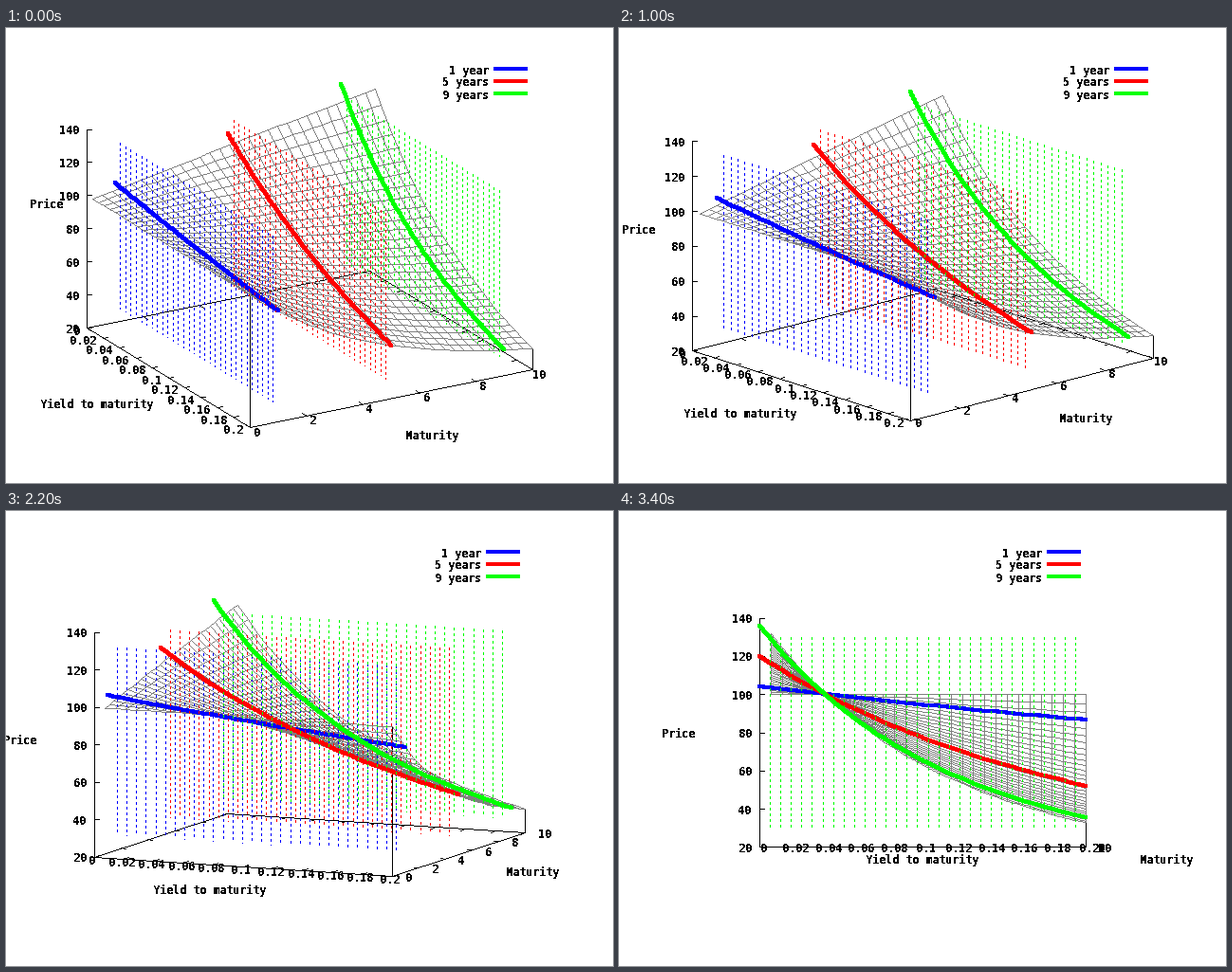
Animation of 640 by 480 pixels, one loop 8000 ms. Source, as a matplotlib script:

```python
import numpy as np
import matplotlib.pyplot as plt
from matplotlib.animation import FuncAnimation

plt.rcParams.update({
    "font.family": "DejaVu Sans Mono",
    "font.weight": "bold",
    "text.antialiased": False,
    "text.hinting_factor": 1,
})

W, H, DPI = 640, 480, 80
BLACK, GRAY = (0, 0, 0), (128, 128, 128)
BLUE, RED, GREEN = (0, 0, 255), (255, 0, 0), (0, 255, 0)
BONDS = [(1, "1 year", BLUE), (5, "5 years", RED), (9, "9 years", GREEN)]
COUPON, FACE = 4, 100

fig = plt.figure(figsize=(W / DPI, H / DPI), dpi=DPI, facecolor="white")
ax = fig.add_axes([0, 0, 1, 1])
ax.axis("off")
canvas = np.full((H, W, 3), 255, np.uint8)
screen = ax.imshow(canvas, interpolation="nearest", aspect="auto")


def price(rate, years):
    disc = (1 + rate) ** -years
    return COUPON * (1 - disc) / rate + FACE * disc


class View:
    """Orthographic view; u = yield and v = maturity in 0..1, z = price."""

    def __init__(self, tilt, turn):
        self.s, self.c = np.sin(np.radians(turn)), np.cos(np.radians(turn))
        self.st, self.ct = np.sin(np.radians(tilt)), np.cos(np.radians(tilt))

    def __call__(self, u, v, z=20):
        u, v, w = np.broadcast_arrays(u - 0.5, v - 0.5, (z - 20) / 120 - 0.5)
        x = 320 + 344 * (u * self.c + v * self.s)
        y = 233.5 + 242 * ((u * self.s - v * self.c) * self.ct - w * self.st)
        return np.stack([x, y], axis=-1)


def unit(vec):
    size = np.hypot(*vec)
    return vec / size if size > 1e-6 else np.zeros(2)


def stroke(segs, color, width=1, dash=None):
    """Draw crisp pixel lines with a square brush; dash = length of dash and gap."""
    segs = np.rint(segs)
    start, delta = segs[:, 0], segs[:, 1] - segs[:, 0]
    steps = np.abs(delta).max(axis=1).astype(int)
    count = steps + 1
    i = np.repeat(np.arange(len(segs)), count)
    k = np.arange(len(i)) - np.repeat(np.cumsum(count) - count, count)
    if dash:
        lit = k % (2 * dash) < dash
        i, k = i[lit], k[lit]
    t = k / np.maximum(steps[i], 1)
    x, y = np.rint(start[i] + delta[i] * t[:, None]).astype(int).T
    brush = np.arange(width) - width // 2
    for dx in brush:
        for dy in brush:
            canvas[y + dy, x + dx] = color


def chain(points):
    """Segments joining neighbours along the second-last axis."""
    return np.stack([points[..., :-1, :], points[..., 1:, :]], axis=-2).reshape(-1, 2, 2)


def label(s, ha="center"):
    return ax.text(0, 0, s, ha=ha, va="baseline", fontsize=11.63 * 72 / DPI,
                   color="black")


def place(text, pos, dx=0.0, dy=0.0):
    text.set_position((pos[0] + dx, pos[1] + dy + 4))


rate_ticks = np.arange(11) / 10
year_ticks = np.arange(6) / 5
cash_ticks = np.arange(20, 141, 20)
names = [label(name, "right") for _, name, _ in BONDS]
rate_labels = [label(f"{0.2 * t:.2g}") for t in rate_ticks]
year_labels = [label(f"{10 * t:.0f}") for t in year_ticks]
cash_labels = [label(str(z), "right") for z in cash_ticks]
rate_title, year_title, cash_title = map(
    label, ("Yield to maturity", "Maturity", "Price"))

# The surface is undefined at zero yield, so the first row is skipped.
grid = np.arange(30) / 29
U, V = np.meshgrid(grid[1:], grid, indexing="ij")
Z = price(0.2 * U, 10 * V)
drop_u = np.arange(1, 31) / 31
curve_u = np.linspace(1e-7, 1, 40)


def draw_box(view, rate_dir, year_dir):
    left, front, right, back = (view(*c) for c in ((0, 0), (1, 0), (1, 1), (0, 1)))
    segs = [(left, front), (front, right), (right, back), (back, left),
            (left, view(0, 0, 140)),
            (front, view(1, 0, 100)),
            (right, view(1, 1, price(0.2, 10)))]
    for t in rate_ticks:
        a, b = view(t, 0), view(t, 1)
        segs += [(a, a + 5 * year_dir), (b, b - 5 * year_dir)]
    for t in year_ticks:
        a, b = view(0, t), view(1, t)
        segs += [(a, a + 5 * rate_dir), (b, b - 5 * rate_dir)]
    for z in cash_ticks:
        a = view(0, 0, z)
        segs.append((a, a + [5, 0]))
    stroke(np.array(segs), BLACK)


def draw_labels(view, rate_dir, year_dir):
    if view.s > 0.5:
        rate_dx, rate_ha = -8 * year_dir[0], "right"
        year_dx, year_ha = 7.9 * rate_dir[0], "center"
    else:
        rate_dx, rate_ha = 3.5 - 15.5 * view.s, "center"
        year_dx, year_ha = 13, "left"
    for t, text in zip(rate_ticks, rate_labels):
        text.set_ha(rate_ha)
        place(text, view(t, 0), rate_dx, 1.3 - 8 * year_dir[1])
    for t, text in zip(year_ticks, year_labels):
        text.set_ha(year_ha)
        place(text, view(1, t), year_dx, 1 + 8 * rate_dir[1])
    for z, text in zip(cash_ticks, cash_labels):
        place(text, view(0, 0, z), -8.5, 1)
    place(rate_title, view(0.5, -0.25), -1.5, 13)
    place(year_title, view(1.25, 0.5), -1, 13)
    place(cash_title, view(-0.25, 0, 80), 0, 0.7)


def draw(i):
    step = min(max(i - 4, 0), 30)
    view = View(60 + step, 60 - 2 * step)
    origin = view(0, 0)
    rate_dir = unit(view(1, 0) - origin)
    year_dir = unit(view(0, 1) - origin)

    canvas[:] = 255
    draw_box(view, rate_dir, year_dir)
    net = view(U, V, Z)
    stroke(chain(net), GRAY)
    stroke(chain(net.swapaxes(0, 1)), GRAY)

    key_x = view(1, 1)[0] - 7
    for n, (years, _, color) in enumerate(BONDS):
        v = years / 10
        stroke(np.stack([view(drop_u, v, 130), view(drop_u, v, 30)], axis=1),
               color, dash=3)
        stroke(chain(view(curve_u, v, price(0.2 * curve_u, years))), color, 4)
        y = 43 + 13 * n
        stroke(np.array([[(key_x - 32, y), (key_x, y)]]), color, 4)
        place(names[n], (key_x - 39.5, y + 1))

    screen.set_data(canvas)
    draw_labels(view, rate_dir, year_dir)
    return []


anim = FuncAnimation(fig, draw, frames=80, interval=100, init_func=lambda: draw(0),
                     repeat=True, repeat_delay=0, blit=False)
plt.show()
```
